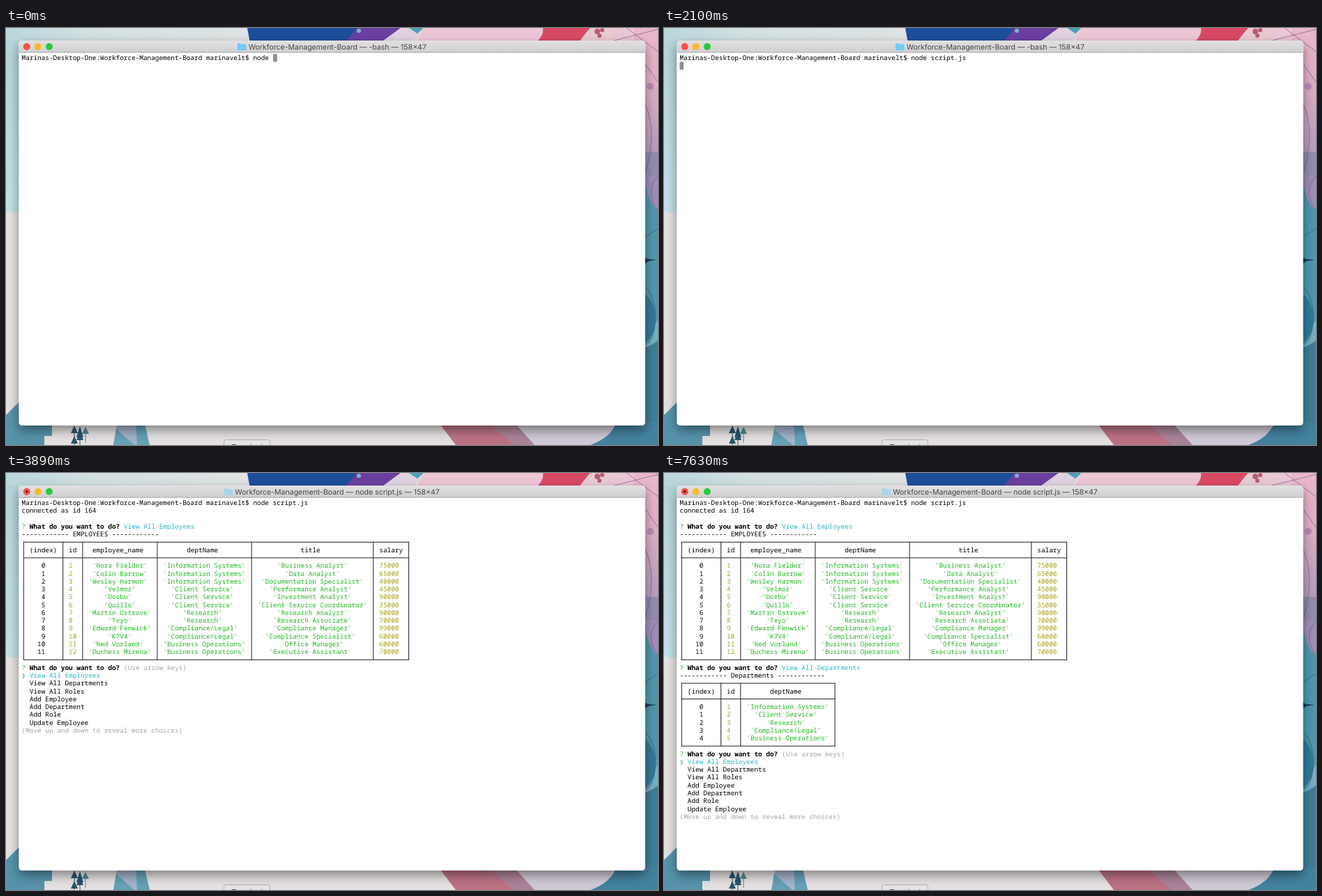
These frames come from a looping animation (935 px wide and 599 px high, 8 s). An HTML page:

```html
<!DOCTYPE html>
<html lang="en">
<head>
<meta charset="utf-8">
<title>Terminal session</title>
<style>
  html, body { margin: 0; width: 100%; height: 100%; overflow: hidden; background: #dedbda; }
  svg { display: block; width: 100vw; height: 100vh; }
  text { text-rendering: geometricPrecision; }
  #screen { font: 500 9.39px "Noto Sans Mono", "DejaVu Sans Mono", monospace; }
  #screen .b { font-weight: 700; }
  #screen .arrow { font: 700 9px "DejaVu Sans Mono", "DejaVu Sans", monospace; }
  .ui { font-family: Inter, "Open Sans", sans-serif; fill: #474647; }
</style>
</head>
<body>
<svg viewBox="0 0 935 599" preserveAspectRatio="none">
  <defs>
    <linearGradient id="bar" x2="0" y2="1">
      <stop stop-color="#e2e0e2"/><stop offset="1" stop-color="#d0cfd0"/>
    </linearGradient>
    <linearGradient id="sky" x2="0" y2="1">
      <stop stop-color="#b3d4d9"/><stop offset="1" stop-color="#c3e1e4"/>
    </linearGradient>
    <linearGradient id="haze">
      <stop stop-color="#b9d7db"/><stop offset=".35" stop-color="#d3e0e1"/><stop offset="1" stop-color="#dfe3e3"/>
    </linearGradient>
    <linearGradient id="side" x2="0" y2="1">
      <stop stop-color="#ecb7cb"/><stop offset=".3" stop-color="#dfaec6"/>
      <stop offset=".6" stop-color="#bd9fbd"/><stop offset="1" stop-color="#948bb0"/>
    </linearGradient>
    <filter id="shade" x="-5%" y="-5%" width="110%" height="115%">
      <feDropShadow dx="0" dy="7" stdDeviation="8" flood-opacity=".42"/>
    </filter>
  </defs>

  <g id="wallpaper">
    <rect width="935" height="599" fill="#e4e1e0"/>
    <path d="M0 0H347V22H0Z" fill="url(#haze)"/>
    <path d="M0 18H30V262Q14 270 0 262Z" fill="url(#sky)"/>
    <path d="M346 0H515L500 22H350Z" fill="#1c4e9b"/>
    <path d="M502 0H566L536 22H482Q496 12 502 0Z" fill="#6b3f9f"/>
    <circle cx="506" cy="4" r="3" fill="#7cb5d6"/>
    <path d="M566 0H598L584 22H536Z" fill="#e0d2e0"/>
    <path d="M578 0H599L590 8Z" fill="#49a2b8"/>
    <path d="M598 0H935V30H584Z" fill="#edc6d6"/>
    <path d="M770 0H838Q828 10 820 24H756Q772 12 770 0Z" fill="#d84a64"/>
    <path d="M838 0H876L866 22H820Z" fill="#e9cad3"/>
    <g fill="#b75b70"><circle cx="848" cy="5" r="4"/><circle cx="855" cy="3" r="3"/><circle cx="851" cy="11" r="3"/></g>
    <path d="M900 0H935V265H900Z" fill="url(#side)"/>
    <path d="M900 178H935V265H900Z" fill="#948bb0"/>
    <path d="M900 215H917Q917 246 935 262V599H860L900 530Z" fill="#4f96b0"/>
    <path d="M917 212H935V262Q918 248 917 212Z" fill="#a08db6"/>
    <path d="M905 375Q934 388 931 424Q928 451 905 458Z" fill="#33799a"/>
    <path d="M905 462L935 450V599H860Z" fill="#407d9b"/>
    <path d="M931 424Q929 448 912 459Q926 458 935 448V420Z" fill="#76aec2"/>
    <path d="M912 328L921 332L933 333L921 335L912 342Z" fill="#173b55"/>
    <g fill="none" stroke="#6c6288" stroke-width=".7">
      <path d="M872 18L935 2M890 0L935 34M917 52L935 78M917 110Q934 150 917 208M935 212Q915 235 935 262"/>
      <path d="M917 300L935 288M917 372Q934 390 931 424Q928 450 917 455" stroke="#255f7d"/>
    </g>
    <circle cx="924" cy="84" r="5" fill="#b98bb5"/>
    <path d="M0 556L18 538L40 560H66V586H55V599H0Z" fill="#5593ab"/>
    <path d="M154 599L160 565H198L206 599Z" fill="#a3b3ca"/>
    <path d="M154 599L158 576L184 599ZM186 565H198L206 599H188Z" fill="#64a1b7"/>
    <g fill="#28546a">
      <path d="M98 571L103 582H93ZM98 586L103 597H93ZM106 572L111 588H101ZM106 580L111 592H101Z"/>
      <path d="M97.5 580h1v19h-1ZM105.5 590h1v9h-1Z"/>
      <path d="M114 573L119 583H109ZM113.5 582h1v14h-1Z" fill="#4d8797"/>
    </g>
    <path d="M620 566H700L765 599H645Z" fill="#bb7284"/>
    <path d="M690 566H745L762 599H728Z" fill="#ab8398"/>
    <path d="M728 566H876Q868 588 838 599H758Z" fill="#cfcad6"/>
    <path d="M880 566H935V599H838Q868 588 876 566Z" fill="#43829f"/>
  </g>

  <rect x="312.5" y="591.5" width="66" height="16" rx="3" fill="#e5e4e4" stroke="#b3b1b1"/>
  <text class="ui" x="345.5" y="606" font-size="11" text-anchor="middle">Terminal</text>

  <rect x="18.5" y="18" width="898" height="553" rx="4.5" fill="#fff" filter="url(#shade)"/>
  <path d="M18.5 35.5V22.5Q18.5 18 23 18H912Q916.5 18 916.5 22.5V35.5Z" fill="url(#bar)"/>
  <path d="M18.5 35H916.5" stroke="#aeadae"/>
  <circle cx="29.7" cy="26.8" r="5" fill="#fa4f49"/>
  <circle cx="45.8" cy="26.8" r="5" fill="#fbb92d"/>
  <circle cx="62" cy="26.8" r="5" fill="#29c940"/>
  <circle id="busy" cx="29.7" cy="26.8" r="1.7" fill="#500806"/>
  <g id="heading">
    <path id="folder" d="M0 1Q0 0 1 0H4L5.3 1.3H11.5Q12.5 1.3 12.5 2.3V9Q12.5 10 11.5 10H1Q0 10 0 9Z"/>
    <text id="title" class="ui" x="15.7" y="8.7" font-size="10.55"></text>
  </g>
  <g id="screen"></g>
</svg>
<script>
const $ = id => document.getElementById(id);
const LOOP = 8000, CW = 5.635, LH = 11.265, LEFT = 22.5, MID = 43;
const GREEN = '#20b820', GOLD = '#a7a01c', CYAN = '#2bb5c8', GREY = '#a5a5a5';
const PROJECT = 'Workforce-Management-Board';
const PROMPT = `Marinas-Desktop-One:${PROJECT} marinavelt$ node `;
const COMMAND = 'script.js';

// Each cut starts a new state; the first seven are typing steps.
const cuts = [0, 300, 450, 600, 750, 900, 1200, 2100, 2250, 2400, 3890, 5830, 7630];
const typed = [0, 1, 2, 4, 6, 7, 9];
const ENTER = 7, RUNNING = 8, MENU = 9, STAFF = 10, MOVED = 11, DEPTS = 12;

const choices = ['View All Employees', 'View All Departments', 'View All Roles',
  'Add Employee', 'Add Department', 'Add Role', 'Update Employee'];
const depts = ['Information Systems', 'Client Service', 'Research',
  'Compliance/Legal', 'Business Operations'];
const staff = [
  ['Nora Fielder', 0, 'Business Analyst', 75000],
  ['Colin Barrow', 0, 'Data Analyst', 65000],
  ['Wesley Harmon', 0, 'Documentation Specialist', 40000],
  ['Velmor', 1, 'Performance Analyst', 45000],
  ['Dorbu', 1, 'Investment Analyst', 90000],
  ['Quillo', 1, 'Client Service Coordinator', 35000],
  ['Martin Ostrove', 2, 'Research Analyst', 90000],
  ['Teyo', 2, 'Research Associate', 70000],
  ['Edward Fenwick', 3, 'Compliance Manager', 99000],
  ['K7V4', 3, 'Compliance Specialist', 60000],
  ['Ned Vorland', 4, 'Office Manager', 60000],
  ['Duchess Mirena', 4, 'Executive Assistant', 70000]
].map(([name, d, title, pay], i) => [i + 1, name, depts[d], title, pay]);

const colX = c => LEFT + c * CW;
const rowY = r => MID + r * LH;

function put(col, row, str, fill = '#000', cls = '') {
  return `<text x="${colX(col)}" y="${rowY(row) + 3.2}" fill="${fill}" class="${cls}">${str}</text>`;
}

function cursor(col, row) {
  return `<rect x="${colX(col)}" y="${rowY(row) - 5.6}" width="5.6" height="11.1" fill="#8f8d91"/>`;
}

function table(row, heads, data) {
  const body = data.map((r, i) => [String(i), ...r.map(v => typeof v === 'string' ? `'${v}'` : String(v))]);
  const all = [['(index)', ...heads], ...body];
  const widths = all[0].map((_, c) => Math.max(...all.map(r => r[c].length)) + 2);
  const edges = [0];
  widths.forEach(w => edges.push(edges.at(-1) + w + 1));
  const x = c => colX(c + .5), bottom = row + 3 + data.length;
  let out = '', lines = '';

  for (const e of edges) lines += `M${x(e)} ${rowY(row)}V${rowY(bottom)}`;
  for (const r of [row, row + 2, bottom]) lines += `M${x(0)} ${rowY(r)}H${x(edges.at(-1))}`;
  out += `<path d="${lines}" fill="none" stroke="#222" stroke-linecap="square"/>`;

  all.forEach((cells, i) => cells.forEach((s, c) => {
    const col = edges[c] + 1 + Math.floor((widths[c] - s.length) / 2);
    const color = !i || !c ? '#000' : s[0] === "'" ? GREEN : GOLD;
    out += put(col, row + 1 + (i ? i + 1 : 0), s, color);
  }));
  return out;
}

function ask(row, note, color) {
  return put(0, row, '?', GREEN) + put(2, row, 'What do you want to do?', '#000', 'b') + put(26, row, note, color);
}

function menu(row, picked, note) {
  let out = ask(row, note, GREY);
  choices.forEach((s, i) => out += put(2, row + 1 + i, s, i === picked ? CYAN : '#000'));
  return out + put(0, row + 1 + picked, '❯', CYAN, 'arrow')
    + put(0, row + 8, '(Move up and down to reveal more choices)', GREY);
}

function banner(row, word) {
  const dash = '-'.repeat(12);
  return put(0, row, `${dash} ${word} ${dash}`);
}

function draw(state) {
  const n = typed[Math.min(state, 6)], running = state >= RUNNING;
  const hint = '(Use arrow keys)';
  let out = put(0, 0, PROMPT + COMMAND.slice(0, n));

  if (state < ENTER) out += cursor(PROMPT.length + n, 0);
  else if (state < MENU) out += cursor(0, 1);
  else out += put(0, 1, 'connected as id 164');

  if (state === MENU) out += menu(3, 0, hint);
  if (state >= STAFF) {
    out += ask(3, choices[0], CYAN) + banner(4, 'EMPLOYEES')
      + table(5, ['id', 'employee_name', 'deptName', 'title', 'salary'], staff);
  }
  if (state === STAFF) out += menu(21, 0, hint);
  if (state === MOVED) out += menu(21, 1, '');
  if (state === DEPTS) {
    out += ask(21, choices[1], CYAN) + banner(22, 'Departments')
      + table(23, ['id', 'deptName'], depts.map((d, i) => [i + 1, d])) + menu(32, 0, hint);
  }

  $('screen').innerHTML = out;
  $('title').textContent = `${PROJECT} — ${running ? 'node script.js' : '-bash'} — 158×47`;
  $('heading').setAttribute('transform', `translate(${running ? 312.5 : 332} 22)`);
  $('folder').setAttribute('fill', running ? '#a5d7ed' : '#71cbf8');
  $('busy').setAttribute('visibility', running ? 'visible' : 'hidden');
}

const start = performance.now();
let shown = -1;
function tick() {
  const t = (performance.now() - start) % LOOP;
  const state = cuts.filter(c => c <= t).length - 1;
  if (state !== shown) draw(shown = state);
  requestAnimationFrame(tick);
}
tick();
</script>
</body>
</html>
```
